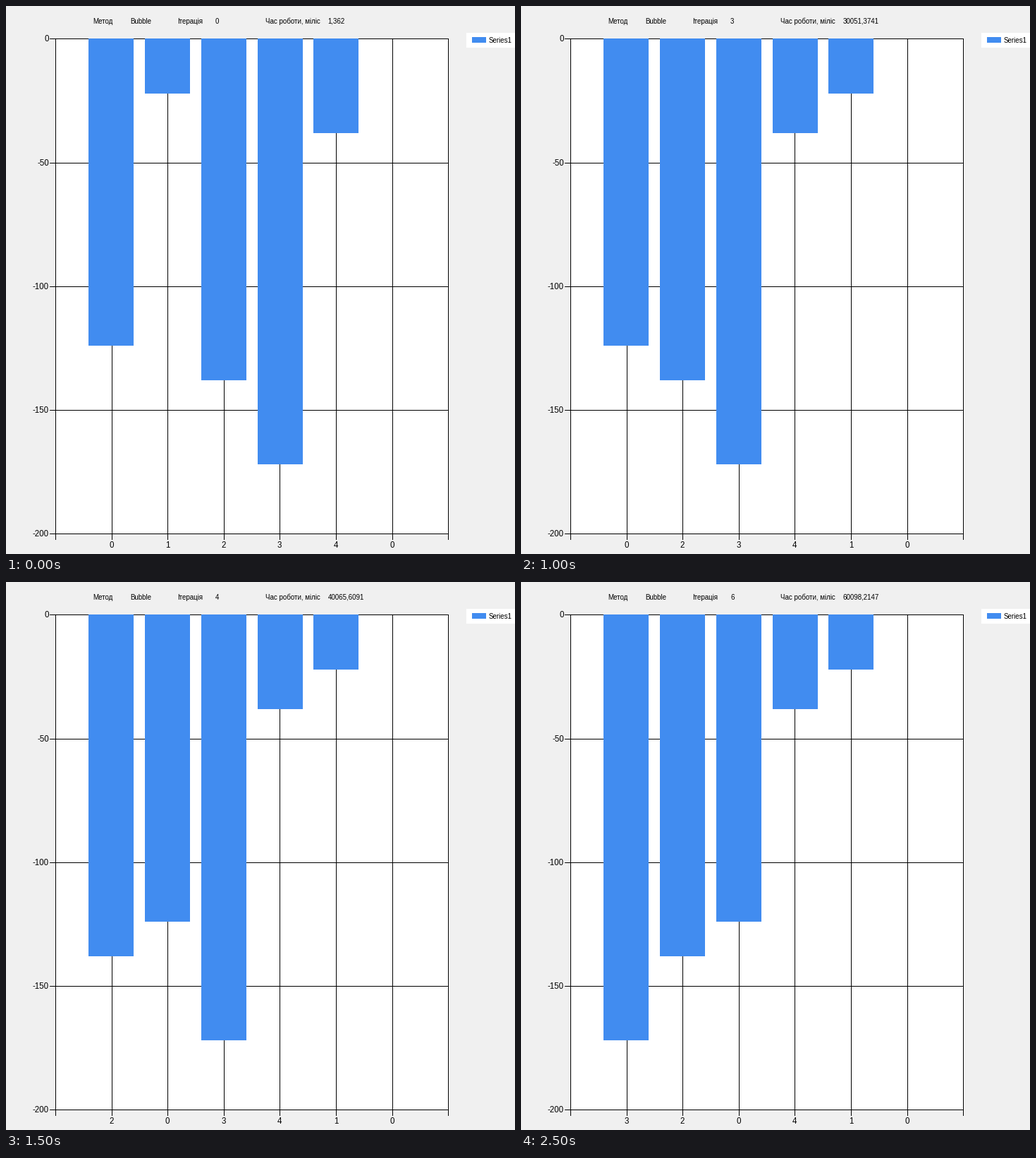
A matplotlib script for the animation above (3 s loop, 722x776 px).

```python
import matplotlib.pyplot as plt
from matplotlib.animation import FuncAnimation
from matplotlib.patches import Rectangle

W, H, DPI = 722, 776, 64
BLUE = "#418cf0"
LEFT, RIGHT, TOP, BOTTOM = 70, 627, 46, 747
UNIT = (BOTTOM - TOP) / 200
VALUES = [124, 22, 138, 172, 38]
TIMES = ["1,362", "20033,4728", "30051,3741", "40065,6091",
         "50080,5941", "60098,2147"]

plt.rcParams["font.family"] = "Liberation Sans"
fig = plt.figure(figsize=(W / DPI, H / DPI), dpi=DPI, facecolor="#f0f0f0")
ax = fig.add_axes([0, 0, 1, 1])
ax.set_xlim(0, W)
ax.set_ylim(H, 0)
ax.axis("off")


def rect(x, y, w, h, color, z=1):
    return ax.add_patch(Rectangle((x, y), w, h, facecolor=color, linewidth=0,
                                  antialiased=False, zorder=z))


def label(x, y, text, px, ha="left"):
    return ax.text(x, y, text, fontsize=px * 72 / DPI, ha=ha,
                   va="baseline", color="black", zorder=5)


def sort_steps(values):
    """Bar order at the start and after every swap of a bubble sort."""
    order = list(range(len(values)))
    steps = [order[:]]
    for last in range(len(order) - 1, 0, -1):
        for i in range(last):
            a, b = order[i], order[i + 1]
            if values[a] < values[b]:
                order[i], order[i + 1] = b, a
                steps.append(order[:])
    return steps


# Plot area, grid and tick marks
rect(LEFT, TOP, RIGHT - LEFT, BOTTOM - TOP, "white")
for k in range(5):
    y = round(TOP + 0.3 + 50 * UNIT * k)
    rect(LEFT - 8, y, RIGHT - LEFT + 9, 1, "black", 2)
    label(61, y + 4, str(-50 * k), 11.5, "right")

columns = [round(70.2 + 79.56 * k) for k in range(8)]
for x in columns:
    rect(x, TOP, 1, BOTTOM - TOP + 9, "black", 2)

# Legend
rect(653, 38, W - 653, 21, "white")
rect(661, 44, 20, 8, BLUE, 2)
label(685, 52, "Series1", 9.8)

# Heading
for x, text in [(123, "Метод"), (176, "Bubble"), (243, "Ітерація"),
                (368, "Час роботи, міліс")]:
    label(x, 25, text, 9.8)
step_text = label(297, 25, "", 9.8)
time_text = label(456.5, 25, "", 9.8)

bars = [rect(round(117.45 + 79.7 * k), TOP, 64, 1, BLUE, 3) for k in range(5)]
names = [label(x, 767, "", 11.5, "center") for x in columns[1:6]]
label(columns[6], 767, "0", 11.5, "center")

steps = sort_steps(VALUES)
shown = [0, 2, 3, 4, 5, 6]  # the first swap is skipped


def draw(frame):
    step = shown[frame]
    step_text.set_text(str(step))
    time_text.set_text(TIMES[frame])
    for bar, name, item in zip(bars, names, steps[step]):
        bar.set_height(round(0.5 + VALUES[item] * UNIT))
        name.set_text(str(item))
    return [*bars, *names, step_text, time_text]


anim = FuncAnimation(fig, draw, frames=len(shown), interval=500,
                     repeat=True, repeat_delay=0, blit=False)
plt.show()
```
